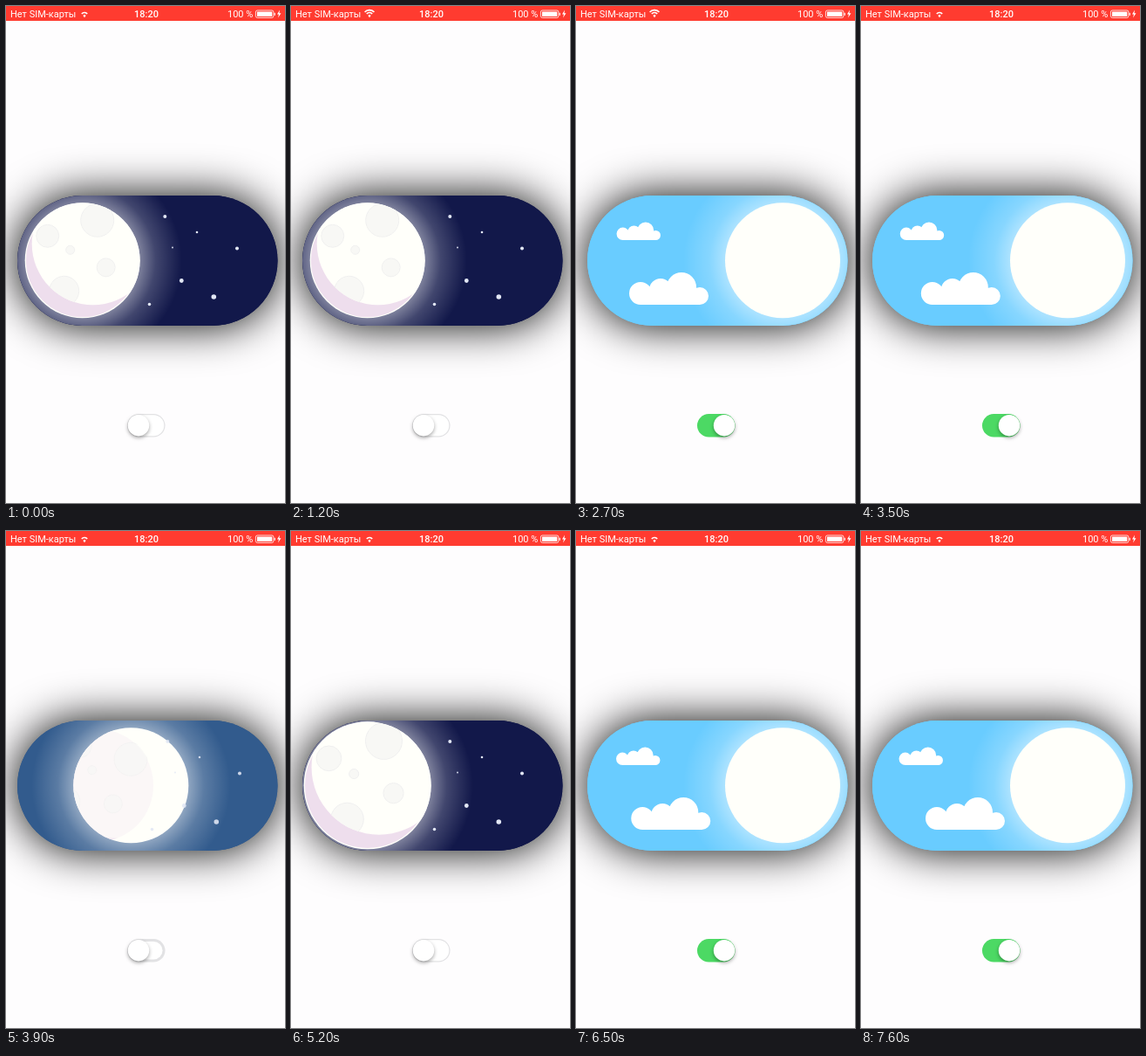
Write an HTML page with a canvas that moves like this. It is 320 by 569 pixels and loops after 8000 ms.

```html
<!DOCTYPE html>
<html lang="ru">
<head>
<meta charset="utf-8">
<title>Day and night switch</title>
<style>
  html, body { margin: 0; width: 100%; height: 100%; overflow: hidden; background: #fefdfe; }
  canvas { display: block; width: 320px; height: 569px; }
</style>
</head>
<body>
<canvas id="stage"></canvas>
<script>
const canvas = document.getElementById('stage');
const ctx = canvas.getContext('2d');
const ratio = window.devicePixelRatio || 1;
canvas.width = 320 * ratio;
canvas.height = 569 * ratio;

const LOOP = 8000;
const TOGGLES = [{ at: 1850, on: true }, { at: 3560, on: false }, { at: 5420, on: true }];
const NIGHT = [18, 24, 74], DAY = [105, 204, 255];
const GREY = [226, 226, 228], GREEN = [76, 217, 100];

const STARS = [[182.3, 241, 2], [219, 259, 1.3], [191, 276.5, 0.9], [265, 277.5, 2],
  [201.3, 314.5, 2.4], [238.3, 333, 2.8], [164.5, 341.5, 1.8]];
const CRATERS = [[-40, -28, 13], [17, -46, 19], [-14, -12, 5], [27, 8, 10.5], [-21, 35, 17]];
const PUFFS = [[14, -13, 13], [37, -17, 13], [61, -20, 17], [82, -10, 10]];

// Key times are milliseconds since the latest toggle.
const MOTION = {
  on: {
    stars: [[0, 0], [150, -26], [380, -113], [800, -108]],
    bigCloud: [[0, 290], [150, 234], [380, 59], [850, 60], [2180, 73]],
    smallCloud: [[0, 330], [150, 265], [380, 102], [550, 50], [850, 46], [2180, 43]],
    bigAlpha: [[0, 0], [150, 0.35], [380, 1]],
    smallAlpha: [[0, 0], [150, 0.25], [380, 0.75], [500, 1]],
    knob: [[0, 0], [150, 0.2], [300, 1]],
    tint: [[0, 0], [150, 0.65], [250, 1]],
    inset: [[0, 1.2], [150, 3], [330, 13.5]]
  },
  off: {
    stars: [[0, -108], [150, -60], [300, 4], [340, 3], [600, 0]],
    bigCloud: [[0, 68], [300, 300]],
    smallCloud: [[0, 44], [300, 320]],
    bigAlpha: [[0, 1], [250, 0]],
    smallAlpha: [[0, 1], [250, 0]],
    knob: [[0, 1], [250, 0]],
    tint: [[0, 1], [250, 0]],
    inset: [[0, 13.5], [340, 3], [450, 1.2]]
  }
};
const PRESS = [[4980, 66], [5130, 73], [5420, 73], [5620, 66]];

function track(keys, t) {
  const next = keys.findIndex(key => key[0] > t);
  if (next === 0) return keys[0][1];
  if (next < 0) return keys[keys.length - 1][1];
  const [t0, a] = keys[next - 1], [t1, b] = keys[next];
  return a + (b - a) * (t - t0) / (t1 - t0);
}

const easeInOut = u => u < 0.5 ? 2 * u * u : 1 - 2 * (1 - u) ** 2;
const mix = (a, b, k) => `rgb(${a.map((v, i) => Math.round(v + (b[i] - v) * k))})`;

function circle(x, y, r, fill) {
  ctx.beginPath();
  ctx.arc(x, y, r, 0, 2 * Math.PI);
  ctx.fillStyle = fill;
  ctx.fill();
}

function pill(x, y, w, h, fill) {
  ctx.beginPath();
  ctx.roundRect(x, y, w, h, h / 2);
  ctx.fillStyle = fill;
  ctx.fill();
}

function shadow(color, blur, dy = 0) {
  ctx.shadowColor = color;
  ctx.shadowBlur = blur * ratio;
  ctx.shadowOffsetY = dy * ratio;
}

function layer(draw) {
  ctx.save();
  draw();
  ctx.restore();
}

function statusBar(fullSignal) {
  ctx.fillStyle = '#ff3b30';
  ctx.fillRect(0, 0, 320, 17);
  ctx.fillStyle = ctx.strokeStyle = '#fff';
  ctx.font = '11px Roboto, sans-serif';
  ctx.fillText('Нет SIM-карты', 5, 13);
  ctx.fillText('100 %', 254, 13);
  ctx.font = '500 11px Roboto, sans-serif';
  ctx.textAlign = 'center';
  ctx.fillText('18:20', 161, 13);

  ctx.lineWidth = 1.6;
  for (const r of fullSignal ? [1.2, 4.4, 7.4] : [1.2, 4.4]) {
    ctx.beginPath();
    ctx.arc(90, 12, r, -Math.PI * 0.76, -Math.PI * 0.24);
    ctx.stroke();
  }
  circle(90, 11.5, 1.2, '#fff');

  ctx.lineWidth = 0.8;
  ctx.beginPath();
  ctx.roundRect(286.4, 5, 20.5, 8.4, 2);
  ctx.stroke();
  ctx.fillRect(288, 6.5, 17.3, 5.4);
  ctx.fillRect(307.6, 7.8, 1.2, 3);
  ctx.beginPath();
  [[314, 4.5], [311, 9.6], [313, 9.6], [312, 13.5], [315.5, 8.2], [313.4, 8.2]]
    .forEach(([x, y]) => ctx.lineTo(x, y));
  ctx.fill();
}

function cloud(x, y, scale, alpha) {
  layer(() => {
    ctx.globalAlpha = alpha;
    ctx.translate(x, y);
    ctx.scale(scale, scale);
    ctx.beginPath();
    for (const [px, py, r] of PUFFS) {
      ctx.moveTo(px + r, py);
      ctx.arc(px, py, r, 0, 2 * Math.PI);
    }
    ctx.rect(14, -18, 68, 18);
    ctx.fillStyle = '#fff';
    ctx.fill();
  });
}

function orb(x, y, r, day, direction) {
  const glow = ctx.createRadialGradient(x, y, r - 2, x, y, r + 48);
  glow.addColorStop(0, 'rgba(255,255,255,.48)');
  glow.addColorStop(0.4, 'rgba(255,255,255,.2)');
  glow.addColorStop(1, 'rgba(255,255,255,0)');
  ctx.fillStyle = glow;
  ctx.fillRect(0, 200, 320, 180);
  circle(x, y, r, '#fffffa');

  // The lunar surface slides and rolls inside the disc.
  layer(() => {
    ctx.beginPath();
    ctx.arc(x, y, r, 0, 2 * Math.PI);
    ctx.clip();
    ctx.globalAlpha = 1 - day;
    ctx.translate(x + direction * day * 105, y);
    ctx.rotate(-direction * day * 1.5);
    ctx.scale(r / 66, r / 66);
    circle(0, 0, 64.8, '#eedeed');
    ctx.beginPath();
    ctx.arc(0, 0, 66, 0, 2 * Math.PI);
    ctx.clip();
    circle(12, -19, 70, '#fffffa');
    ctx.clip();
    ctx.strokeStyle = '#eeeeee';
    ctx.lineWidth = 0.8;
    for (const [cx, cy, cr] of CRATERS) {
      circle(cx, cy, cr, '#f8f8f5');
      ctx.stroke();
    }
  });
}

function smallSwitch(knob, tint, inset) {
  pill(139, 467, 43.5, 26.5, mix(GREY, GREEN, tint));
  if (inset < 13) pill(139 + inset, 467 + inset, 43.5 - 2 * inset, 26.5 - 2 * inset, '#fff');
  layer(() => {
    shadow('rgba(0,0,0,.35)', 4, 2);
    circle(152 + 18 * knob, 480.2, 12.2, '#fff');
  });
}

function render(t) {
  const toggle = TOGGLES.filter(item => item.at <= t).pop();
  const on = !!toggle && toggle.on;
  const since = toggle ? t - toggle.at : LOOP;
  const motion = on ? MOTION.on : MOTION.off;
  const value = name => track(motion[name], since);
  const progress = easeInOut(Math.min(1, since / 600));
  const day = on ? progress : 1 - progress;
  const sky = mix(NIGHT, DAY, day);

  ctx.setTransform(ratio, 0, 0, ratio, 0, 0);
  ctx.fillStyle = '#fefdfe';
  ctx.fillRect(0, 0, 320, 569);

  layer(() => {
    shadow('#000', 50);
    pill(13, 217, 298.5, 149, sky);
  });
  layer(() => {
    pill(13, 217, 298.5, 149, sky);
    ctx.clip();
    orb(87.7 + 149.3 * day, 291.3, track(PRESS, t), day, on ? 1 : -1);
    ctx.globalAlpha = on ? 1 - day : Math.min(1, progress * 1.4);
    for (const [x, y, r] of STARS) circle(x + value('stars'), y, r, '#e2e7f5');
    ctx.globalAlpha = 1;
    cloud(value('smallCloud'), 268, 0.554, value('smallAlpha'));
    cloud(value('bigCloud'), 342, 1, value('bigAlpha'));
  });

  layer(() => statusBar(t >= 1200 && t < 3300));
  smallSwitch(value('knob'), value('tint'), value('inset'));
}

function frame() {
  render(performance.now() % LOOP);
  requestAnimationFrame(frame);
}
frame();
</script>
</body>
</html>
```
